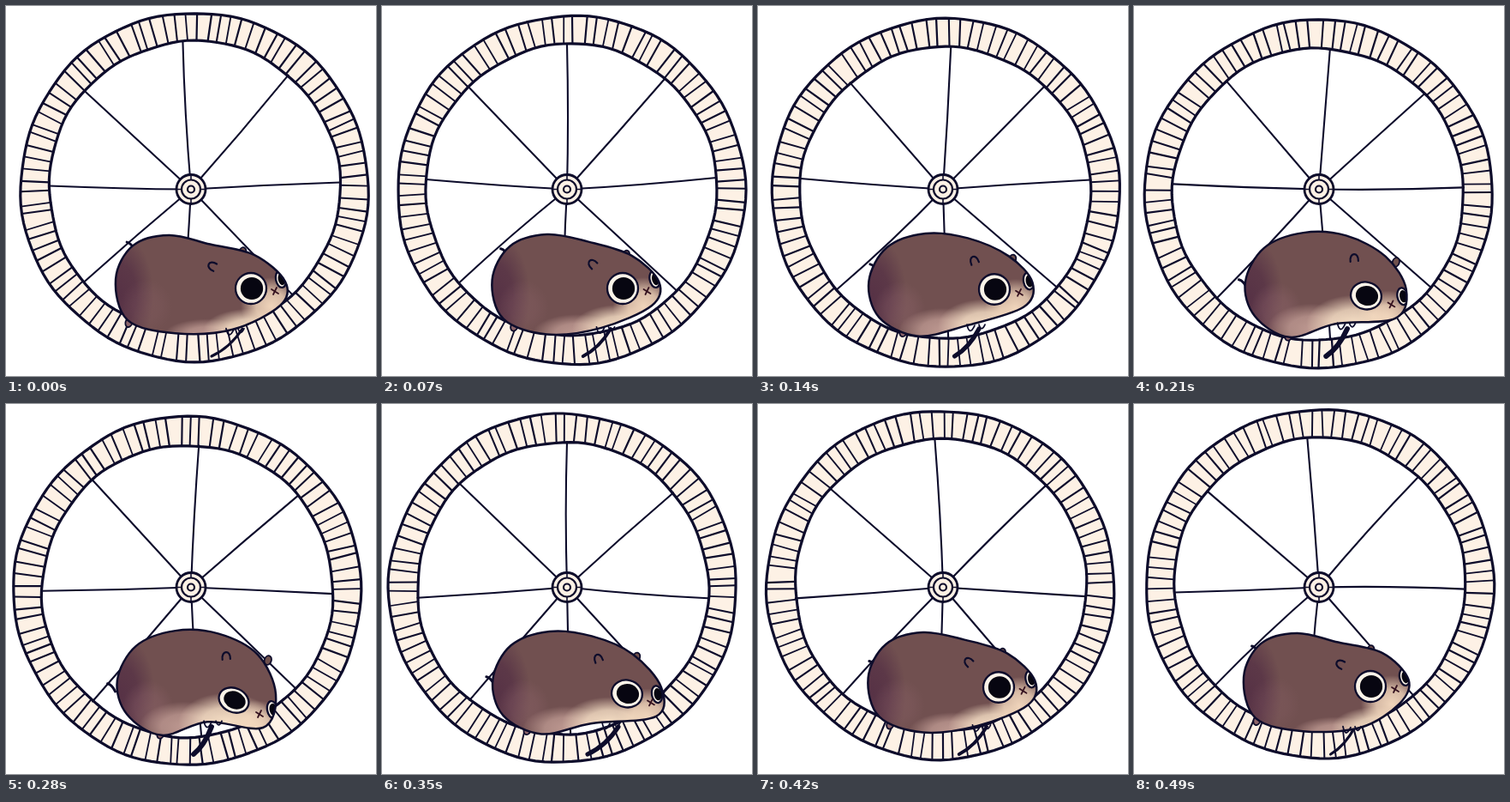
Recreate the animation shown at these times as an HTML page with a canvas. Size 432x431 px, loop 560 ms.

```html
<!DOCTYPE html>
<html lang="en">
<head>
<meta charset="utf-8">
<title>Hamster wheel</title>
<style>
html, body { margin: 0; width: 100%; height: 100%; overflow: hidden; background: #fff; }
canvas { display: block; }
</style>
</head>
<body>
<canvas width="432" height="431"></canvas>
<script>
const ctx = document.querySelector('canvas').getContext('2d');
const INK = '#0d0c2b', CREAM = '#fdf1e5';
const FRAME_MS = 70, STEPS = 8, LUNGE_STEP = 5;
const SLATS = 93, OUTER = 203, INNER = 170, HUB = { x: 216, y: 213.5 };

// Key points of the outline, clockwise from the rump: stretched out, then gathered up
const BACK = [[128, 318, 130, 322], [148, 279, 152, 282], [190, 267, 198, 264],
  [238, 278, 248, 267], [290, 290, 294, 292]];
const HEAD = [[326, 321, 315, 338], [320, 349, 300, 377]];
const BELLY = [[266, 377, 234, 370], [198, 381, 181, 386], [142, 366, 141, 361]];

const mix = (a, b, k) => a + (b - a) * k;
const radians = degrees => degrees * Math.PI / 180;
// Cosine wave over one loop, highest at the given step
const wave = (step, peak) => Math.cos(2 * Math.PI * (step - peak) / STEPS);

function randomFrom(seed) {
  return () => (seed = (seed * 16807) % 2147483647) / 2147483647;
}

function ink(width) {
  ctx.strokeStyle = INK;
  ctx.lineWidth = width;
  ctx.stroke();
}

function curve(x1, y1, cx, cy, x2, y2, width) {
  ctx.beginPath();
  ctx.moveTo(x1, y1);
  ctx.quadraticCurveTo(cx, cy, x2, y2);
  ink(width);
}

function oval(x, y, rx, ry = rx, tilt = 0) {
  ctx.beginPath();
  ctx.ellipse(x, y, rx, ry, radians(tilt), 0, 2 * Math.PI);
}

function rimPoint(center, radius, angle, phase) {
  const r = radius + 0.8 * Math.sin(5 * angle + phase) + 0.5 * Math.sin(13 * angle + phase * 2);
  return [center.x + r * Math.cos(angle), center.y + r * Math.sin(angle)];
}

function addRim(center, radius, phase) {
  for (let i = 0; i < 120; i++) {
    const point = rimPoint(center, radius, i * Math.PI / 60, phase);
    i ? ctx.lineTo(...point) : ctx.moveTo(...point);
  }
  ctx.closePath();
}

// Where a ray from the hub meets the inner rim
function spokeEnd(center, angle) {
  const dx = Math.sin(angle), dy = -Math.cos(angle);
  const ox = HUB.x - center.x, oy = HUB.y - center.y;
  const along = ox * dx + oy * dy;
  const reach = Math.sqrt(along * along - ox * ox - oy * oy + INNER * INNER) - along;
  return [HUB.x + dx * reach, HUB.y + dy * reach];
}

function drawWheel(step) {
  const random = randomFrom(911 + step * 577);
  const center = { x: 216 + 5 * wave(step, 0.8), y: 214.2 + 5 * wave(step, 3) };

  ctx.beginPath();
  addRim(center, OUTER, step);
  addRim(center, INNER, step + 2);
  ctx.fillStyle = CREAM;
  ctx.fill('evenodd');
  ink(3.2);

  for (let i = 0; i < SLATS; i++) {
    const angle = (i + (random() - 0.5) * 0.35) * 2 * Math.PI / SLATS;
    ctx.beginPath();
    ctx.moveTo(...rimPoint(center, INNER, angle, step + 2));
    ctx.lineTo(...rimPoint(center, OUTER, angle + (random() - 0.5) * 0.02, step));
    ink(1.7 + random() * 0.6);
  }

  for (let i = 0; i < 8; i++) {
    const swing = 4.5 * wave(step, 3 + 1.1 * i);
    const [x, y] = spokeEnd(center, radians(45 * i + swing));
    const bend = (random() - 0.5) * 6;
    curve(HUB.x, HUB.y, (HUB.x + x) / 2 + bend, (HUB.y + y) / 2 + bend, x, y, 2.1);
  }
  drawHub();
}

function drawHub() {
  oval(HUB.x, HUB.y, 17);
  ctx.fillStyle = CREAM;
  ctx.fill();
  ink(2.8);
  for (let i = 0; i < 4; i++) {
    const dx = Math.cos(i * Math.PI / 2), dy = Math.sin(i * Math.PI / 2);
    ctx.beginPath();
    ctx.moveTo(HUB.x + 12 * dx, HUB.y + 12 * dy);
    ctx.lineTo(HUB.x + 17 * dx, HUB.y + 17 * dy);
    ink(1.6);
  }
  oval(HUB.x, HUB.y, 11);
  ink(2.2);
  oval(HUB.x, HUB.y, 4);
  ink(2.2);
}

function smoothPath(points) {
  const n = points.length;
  const at = i => points[(i + n) % n];
  const path = new Path2D();
  path.moveTo(...at(0));
  for (let i = 0; i < n; i++) {
    const [a, b, c, d] = [at(i - 1), at(i), at(i + 1), at(i + 2)];
    path.bezierCurveTo(b[0] + (c[0] - a[0]) / 6, b[1] + (c[1] - a[1]) / 6,
      c[0] - (d[0] - b[0]) / 6, c[1] - (d[1] - b[1]) / 6, ...c);
  }
  return path;
}

// Soft elliptical patch of fur; rgb is "r,g,b"
function glow(x, y, rx, ry, rgb, alpha) {
  ctx.save();
  ctx.translate(x, y);
  ctx.scale(rx, ry);
  const shade = ctx.createRadialGradient(0, 0, 0, 0, 0, 1);
  shade.addColorStop(0, `rgba(${rgb},${alpha})`);
  shade.addColorStop(0.5, `rgba(${rgb},${alpha * 0.8})`);
  shade.addColorStop(1, `rgba(${rgb},0)`);
  ctx.fillStyle = shade;
  ctx.fillRect(-1, -1, 2, 2);
  ctx.restore();
}

function drawEye(x, y, rx, ry, tilt) {
  oval(x, y, rx, ry, tilt);
  ctx.fillStyle = '#fbf3e8';
  ctx.fill();
  ink(2.3);
  oval(x + 1, y, rx * 0.73, ry * 0.72, tilt);
  ctx.fillStyle = '#070611';
  ctx.fill();
}

function drawEar(x, y, tilt) {
  ctx.save();
  ctx.translate(x, y);
  ctx.rotate(radians(tilt));
  ctx.beginPath();
  ctx.moveTo(-4, 5);
  ctx.bezierCurveTo(-7, -6, 4, -8, 5, 3);
  ink(2.2);
  ctx.restore();
}

function drawNose(x, y) {
  ctx.beginPath();
  ctx.moveTo(x - 4, y - 2);
  ctx.lineTo(x + 4, y + 3);
  ctx.moveTo(x + 2, y - 4);
  ctx.lineTo(x - 2, y + 4);
  ctx.strokeStyle = '#34111f';
  ctx.lineWidth = 1.8;
  ctx.stroke();
}

function drawStub(x, y, fill) {
  oval(x, y, 4, 5.5, 20);
  ctx.fillStyle = fill;
  ctx.fill();
  ink(1.8);
}

function drawHamster(step) {
  const gather = (1 + wave(step, 3.5)) / 2;
  const dip = ((1 + wave(step, 4)) / 2) ** 4;
  // The head lunges forward twice a loop and slides back in between
  const slide = step % LUNGE_STEP / 4;

  const pose = (points, kx, ky) =>
    points.map(([x1, y1, x2, y2]) => [mix(x1, x2, kx), mix(y1, y2, ky)]);
  const back = pose(BACK, gather, gather);
  const head = pose(HEAD, slide, dip);
  const belly = pose(BELLY, gather, gather);
  const path = smoothPath([...back, ...head, ...belly]);

  const [rump, haunch] = back, [chinX, chinY] = belly[0];
  const noseX = 314 - 18 * slide, noseY = 332 + 29 * dip;
  const pawX = 261 - 26 * slide, pawY = 381 - 7 * gather;

  const legX = 276 - 36 * slide, toeX = 240 - 21 * slide;
  curve(legX, 376, mix(legX, toeX, 0.4), 398, toeX, 408, 3 + 3 * gather);

  const tailAt = 0.4 + 0.6 * wave(step, 0);
  const tailX = mix(rump[0], haunch[0], tailAt) - 2, tailY = mix(rump[1], haunch[1], tailAt);
  curve(tailX + 4, tailY + 5, tailX, tailY - 3, tailX - 5, tailY - 4, 3);
  drawStub(275 + 32 * gather, 286 + 13 * gather, '#70514d');
  drawStub(142 + 40 * gather, 368 + 17 * gather, '#8d656a');

  ctx.save();
  ctx.clip(path);
  ctx.fillStyle = '#715050';
  ctx.fillRect(100, 240, 250, 170);
  glow(rump[0] + 4, rump[1] + 18, 40, 72, '78,40,66', 0.75);
  glow(rump[0] + 36, rump[1] + 32, 30, 32, '148,104,112', 0.2 + 0.2 * gather);
  glow(chinX - 28, chinY + 6, 52, mix(18, 30, gather), '214,176,166', 0.75);
  glow(chinX + 22, chinY, 56, mix(24, 34, gather), '246,223,197', 1);
  glow(noseX - 4, noseY + 18, 36, 34, '246,219,192', 0.95);
  drawEye(321 - 10 * slide, 318 + 38 * dip, 6, 10, -10);
  drawEye(286 - 20 * slide, 329 + 16 * dip, 18, 18 - 4 * dip, 24 * dip);
  ctx.restore();

  ctx.strokeStyle = INK;
  ctx.lineWidth = 2.5;
  ctx.stroke(path);
  drawEar(240 + 18 * gather, 303 - 10 * gather, -55 + 65 * gather);
  drawNose(noseX, noseY);
  curve(pawX - 4, pawY - 5, pawX - 1, pawY + 9, pawX + 5, pawY - 4, 1.8);
  curve(pawX + 10, pawY - 5, pawX + 13, pawY + 4, pawX + 17, pawY - 5, 1.8);
}

function draw(step) {
  ctx.fillStyle = '#fff';
  ctx.fillRect(0, 0, 432, 431);
  drawWheel(step);
  drawHamster(step);
}

const start = performance.now();
let shown = 0;
function tick() {
  const step = Math.floor((performance.now() - start) / FRAME_MS) % STEPS;
  if (step !== shown) draw(shown = step);
  requestAnimationFrame(tick);
}

ctx.lineCap = ctx.lineJoin = 'round';
draw(shown);
tick();
</script>
</body>
</html>
```
